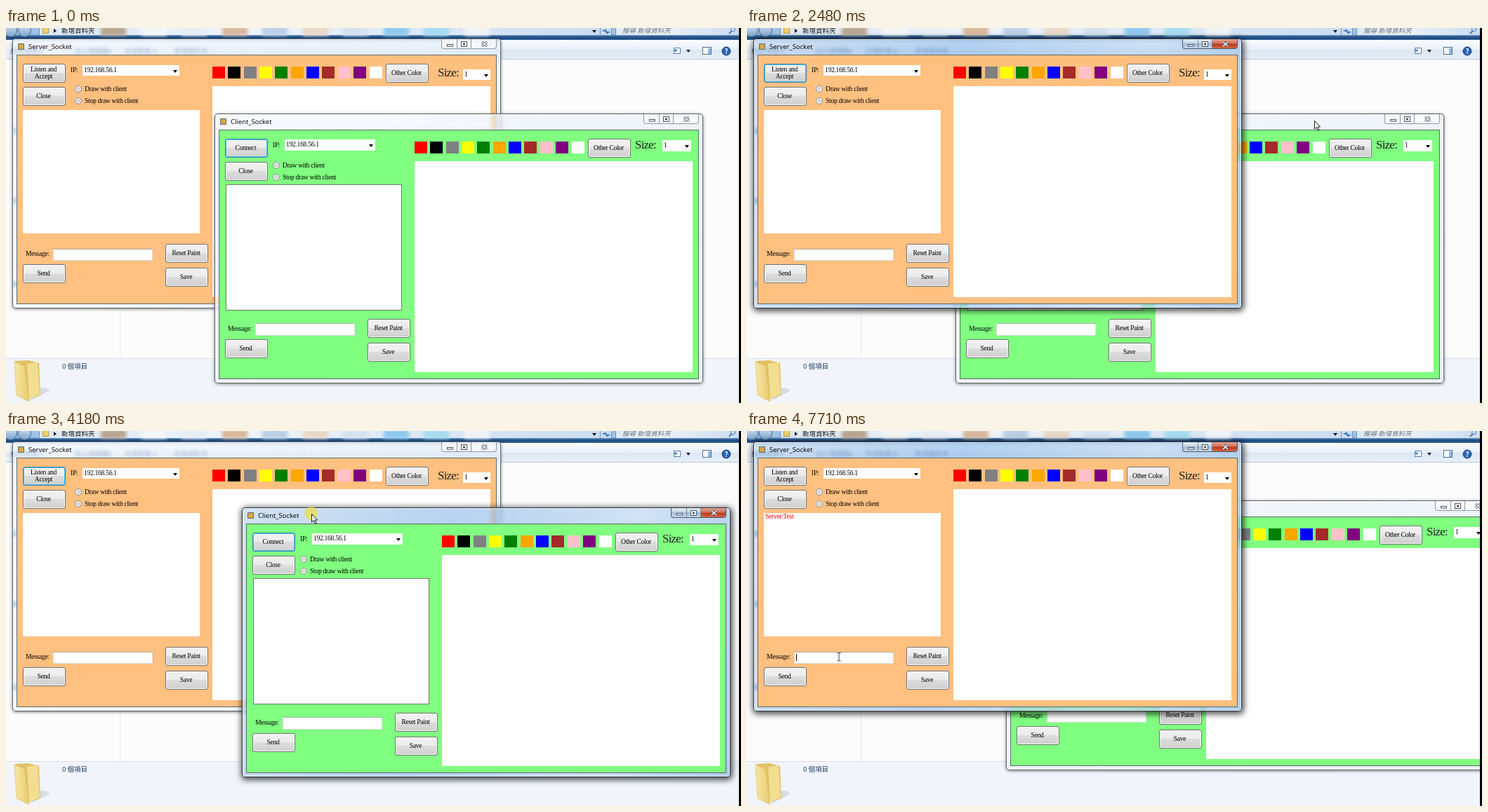
Write an HTML page that moves like this. It is 1047 px wide and 535 px high and loops after 8 s.

```html
<!DOCTYPE html>
<html lang="zh-Hant">
<head>
<meta charset="utf-8">
<title>Socket windows</title>
<style>
html, body { margin: 0; width: 100%; height: 100%; overflow: hidden; background: #fcfcfc; }
#stage { position: absolute; left: 0; top: 0; width: 1047px; height: 535px; overflow: hidden; background: #fcfcfc;
  font: 9.6px/10px 'Liberation Serif', serif; letter-spacing: -.3px; color: #000; }
#stage * { position: absolute; box-sizing: border-box; white-space: nowrap; }
#desk { inset: 0; font: 9.5px/12px 'Noto Sans CJK TC', 'Noto Sans CJK', sans-serif; letter-spacing: 0; color: #1e395b; }
#glass { left: 0; top: 0; width: 1047px; height: 18px;
  background: linear-gradient(#9fc3e6 0 9px, #3f74ae 11px, #1b4679 14px, #33659f 17px, #dfeaf6 18px); }
.field { top: -6px; height: 17px; border: 1px solid #6f91b5; background: linear-gradient(90deg, #dbe8f5, #eef4fb 35%, #c9dcf0); }
.smear { top: -2px; width: 36px; height: 13px; filter: blur(2.5px); }
.nav { top: -5px; width: 19px; height: 18px; border-radius: 50%; border: 1px solid #44688f; background: linear-gradient(#cfe0f1, #7fa5cd); }
.link { left: 9px; width: 7px; height: 9px; border-radius: 3px; background: #4c8fd0; }
#tools { left: 0; top: 17px; width: 1047px; height: 28px; border-bottom: 1px solid #b9cbe0;
  background: linear-gradient(#fafcfe, #e9f0f9 50%, #dde7f3 52%, #e6eef8); }
#tools span { top: 9px; color: #1e4a8c; }
#pane { left: 0; top: 471px; width: 1047px; height: 64px; background: #f1f5fb; border-top: 1px solid #d5dfeb; }
#split { left: 162px; top: 45px; width: 1px; height: 426px; background: #e2ebf5; }
#edge { left: 1044px; top: 0; width: 3px; height: 535px; background: #000; z-index: 9; }

.win { width: 696px; height: 385px; border-radius: 5px; z-index: 1;
  backdrop-filter: blur(2px); background: linear-gradient(100deg, rgba(244,248,253,.62), rgba(226,236,247,.58));
  box-shadow: inset 0 0 0 1px #59636f, inset 0 0 0 2px rgba(255,255,255,.75), 0 1px 4px rgba(0,0,0,.5); }
.win.front { z-index: 2; }
.win.active { background: linear-gradient(100deg, rgba(188,212,238,.66), rgba(146,188,232,.66) 40%, rgba(186,212,240,.66) 75%, rgba(140,184,228,.68));
  box-shadow: inset 0 0 0 1px #2c3540, inset 0 0 0 2px rgba(255,255,255,.7), 1px 2px 8px 2px rgba(0,0,0,.68); }
.title { left: 23px; top: 5px; font: 9.5px/13px 'Open Sans', 'Noto Sans', sans-serif; letter-spacing: 0; }
.icon { left: 8px; top: 7px; width: 9px; height: 9px; background: #d9a53c; border: 1px solid #56708f; }
.caps { left: 611px; top: 1px; width: 79px; height: 14px; border: 1px solid #8b98a8; border-top: 0; border-radius: 0 0 4px 4px;
  overflow: hidden; background: rgba(255,255,255,.45); }
.caps svg { left: 0; top: 0; }
.caps .red { display: none; left: 42px; top: 0; width: 37px; height: 14px; background: linear-gradient(#e3a597, #cf6a52 45%, #b9341a 50%, #d9714c); }
.active .caps { border-color: #4a5868; background: linear-gradient(#e4edf6, #c3d4e6 45%, #a5bcd4 50%, #c4d8ec); }
.active .red { display: block; }
.form { left: 6px; top: 23px; width: 684px; height: 356px; border: 1px solid #5b6b70; }
.btn { width: 61px; height: 27px; border: 1px solid #707070; border-radius: 3px; display: flex; align-items: center; justify-content: center;
  text-align: center; padding: 0 2px 1px 0; box-shadow: inset 0 0 0 1px #fbfbfb; background: linear-gradient(#f2f2f2, #ebebeb 48%, #dddddd 50%, #cfcfcf); }
#stage .btn span { position: static; white-space: pre; }
.btn.focus { border-color: #3c7fb1; box-shadow: inset 0 0 0 1px #4cc4ee; }
.btn.hover { border-color: #3c7fb1; background: linear-gradient(#eaf6fd, #d9f0fc 48%, #bee6fd 50%, #a7d9f5); }
.btn.down { border-color: #2c628b; box-shadow: inset 1px 1px 1px #8aa6b8; background: linear-gradient(#e5f4fc, #c4e5f6 48%, #98d1ef 50%, #68b3db); }
.box { background: #fff; }
.combo::after { content: ""; position: absolute; right: 3px; top: 7px; border: 3.5px solid transparent; border-top: 4px solid #000; border-bottom: 0; }
.combo span { left: 2px; top: 2px; }
.input { border: 1px solid #dcdcdc; border-top-color: #aaa; }
.radio { width: 10px; height: 10px; border: 1px solid #8e8f8f; border-radius: 50%; background: radial-gradient(#d0d0d0 25%, #f6f6f6 70%); }
.size { font-size: 17px; line-height: 20px; letter-spacing: -.8px; color: #222; }
#typed { left: 3px; top: 2px; }
#caret { width: 1px; height: 10px; top: 2px; background: #000; }
#chat { left: 2px; top: 0; color: #f00; }
#pointer { left: 0; top: 0; width: 0; height: 0; z-index: 5; }
#glow { left: -10px; top: -10px; width: 19px; height: 19px; border-radius: 50%; background: rgba(240,225,30,.6); }
#pointer svg { left: -12px; top: -12px; overflow: visible; }
</style>
</head>
<body>
<div id="stage">
  <div id="desk">
    <div id="glass">
      <div class="nav" style="left:-3px"></div><div class="nav" style="left:17px"></div>
      <div class="field" style="left:47px;width:816px"></div>
      <div class="field" style="left:868px;width:177px"></div>
      <div id="smears"></div>
      <div style="left:52px;top:-1px;width:9px;height:9px;background:#ecd06c;border:1px solid #b8974a"></div>
      <svg width="1047" height="18" fill="#111">
        <path d="M68 1l4 3-4 3zM835 3h6l-3 4z"/>
        <path d="M846.500 0v11" stroke="#7894b4"/>
        <path d="M850 4h5l-2-2m7 4h-5l2 2" fill="none" stroke="#2867b4" stroke-width="1.300"/>
        <path d="M1030 8l4-4" stroke="#4a78ae" stroke-width="2"/><circle cx="1035.500" cy="2" r="3" fill="none" stroke="#4a78ae"/>
      </svg>
      <span style="left:79px;top:-3px;color:#111">新增資料夾</span>
      <span style="left:878px;top:-3px;color:#66727f;font-style:italic">搜尋 新增資料夾</span>
    </div>
    <div id="tools">
      <span style="left:7px">組合管理 ▾</span><span style="left:98px">加入媒體櫃▾</span>
      <span style="left:169px">共用對象 ▾</span><span style="left:240px">新增資料夾</span>
      <svg width="1047" height="28">
        <rect x="951.500" y="11.500" width="9" height="8" fill="#fff" stroke="#5f7fa6"/><path d="M952 13.500h4v3h-4z" fill="#4f8fd0"/>
        <path d="M969 14h6l-3 4z" fill="#223"/>
        <rect x="992.500" y="10.500" width="12" height="10" fill="#fff" stroke="#4d6d96"/><path d="M1000 12h4v8h-4z" fill="#8eb6e2"/>
        <circle cx="1026" cy="16" r="6" fill="#2b62b0" stroke="#173f7b"/>
        <text x="1026" y="19.500" text-anchor="middle" font-size="10" font-weight="bold" fill="#fff">?</text>
      </svg>
    </div>
    <div class="link" style="top:142px"></div><div class="link" style="top:242px"></div><div class="link" style="top:361px"></div>
    <div id="split"></div>
    <div id="pane">
      <svg width="70" height="64">
        <defs><linearGradient id="gold"><stop stop-color="#f6e7a4"/><stop offset="1" stop-color="#e8cb70"/></linearGradient></defs>
        <path d="M34 60l29-15-9-4-12 2z" fill="#d6dce4"/>
        <path d="M13 3l19-1 15 4 2 46-22 7z" fill="#e0c163"/>
        <path d="M30 7l15-2 3 46-15 6z" fill="#f2de91"/>
        <path d="M12 4l14 6 7 51-18-9z" fill="url(#gold)" stroke="#dcbc62" stroke-width=".6"/>
      </svg>
      <span style="left:80px;top:4px">0 個項目</span>
    </div>
  </div>
  <div id="pointer">
    <div id="glow"></div>
    <svg width="24" height="24" viewBox="-12 -12 24 24">
      <path id="arrow" d="M.5 .5V12L3.200 9.600 5.200 14.300 7 13.500 5 9H8.500Z" fill="#fff" stroke="#000" stroke-width=".9"/>
      <path id="beam" d="M-2.500 -5.500H-.5L0 -5 .5 -5.500H2.500M0 -5V5.500M-2.500 6H-.5L0 5.500 .5 6H2.500" fill="none" stroke="#222" stroke-width=".9"/>
      <path id="resize" d="M0 -9L4 -5H1V5H4L0 9-4 5H-1V-5H-4Z" fill="#fff" stroke="#000" stroke-width=".9"/>
    </svg>
  </div>
  <div id="edge"></div>
</div>
<script>
const stage = document.getElementById('stage');
const $ = id => document.getElementById(id);
const COLORS = ['red', 'black', 'gray', 'yellow', 'green', 'orange', 'blue', 'brown', 'pink', 'purple', 'white'];
const LOOP = 8000;

function add(parent, cls, x, y, w, h, text) {
  const el = document.createElement('div');
  el.className = cls;
  el.style.left = x + 'px';
  el.style.top = y + 'px';
  if (w) el.style.width = w + 'px';
  if (h) el.style.height = h + 'px';
  if (text) {
    const span = document.createElement('span');
    span.textContent = text;
    el.append(span);
  }
  parent.append(el);
  return el;
}

function makeWindow(o) {
  const win = add(stage, 'win', o.x, o.y);
  win.innerHTML = `<div class="icon"></div><div class="title">${o.title}</div>
    <div class="caps"><div class="red"></div><svg width="79" height="14">
    <g fill="#fff" stroke="#4c5663"><path d="M21.500 0V14M41.500 0V14" opacity=".6"/>
    <rect x="7.500" y="7.500" width="8" height="2.500"/><rect x="27.500" y="3.500" width="8" height="7"/><rect x="30.500" y="6" width="2" height="2"/></g>
    <path d="M57 4l7 6m0-6l-7 6" stroke="#4c5663" stroke-width="3"/><path d="M57 4l7 6m0-6l-7 6" stroke="#fff" stroke-width="1.500"/></svg></div>`;
  add(win, 'form', 6, 23).style.background = o.color;
  const button = (x, y, text) => add(win, 'btn', x, y, 0, 0, text);
  const main = button(15, 36, o.main);
  button(15, 69, 'Close');
  button(15, 322, 'Send');
  button(218, 293, 'Reset Paint');
  button(218, 327, 'Save');
  button(532, 36, 'Other Color');
  add(win, '', 83, 40, 14, 10, 'IP:');
  add(win, 'box combo', ...o.ip, '192.168.56.1');
  add(win, 'box combo', ...o.sizeBox, '1');
  add(win, 'size', o.size[0], o.size[1] - 10, 40, 20, 'Size:');
  ['Draw with client', 'Stop draw with client'].forEach((text, i) => {
    const [x, y] = o.radio;
    add(win, 'radio', x - 5, y - 5 + i * 17);
    add(win, '', x + 9, y - 5 + i * 17, 90, 10, text);
  });
  COLORS.forEach((c, i) => add(win, '', Math.round(285 + i * 22.35), 40, 18, 17).style.background = c);
  add(win, 'box', 285, 68, 396, 301);
  const list = add(win, 'box', ...o.list);
  add(win, '', 19, 302, 40, 10, 'Message:');
  const input = add(win, 'box input', ...o.input);
  return { win, main, list, input };
}

const server = makeWindow({
  x: 9, y: 15, title: 'Server_Socket', color: '#ffc080', main: 'Listen and\nAccept',
  ip: [100, 38, 138, 15], sizeBox: [642, 44, 39, 15], size: [606, 49], radio: [94, 72],
  list: [15, 102, 252, 176], input: [58, 300, 142, 17]
});
const client = makeWindow({
  x: 297, y: 122, title: 'Client_Socket', color: '#80ff80', main: 'Connect',
  ip: [100, 37, 129, 16], sizeBox: [638, 38, 41, 16], size: [599, 45], radio: [88, 74],
  list: [16, 101, 251, 180], input: [58, 299, 142, 18]
});
client.list.style.border = '1px solid #6f7a70';
server.list.innerHTML = '<span id="chat">Server:Test</span>';
server.input.innerHTML = '<span id="typed"></span><span id="caret"></span>';

['#b8a48e', '#f4f6f8', '#e6eef5', '#d9b79a', '#b9cfe6', '#e8d8c8', '#d4e2f0', '#8cc8ee', '#a5dcf0', '#f0f4f8']
  .forEach((c, i) => add($('smears'), 'smear', 135 + i * 57.5, -2).style.background = c);

// Pointer moves: start, end, steps, then the points passed through.
const MOVES = [
  [70, 400, 4, [921, 118], [227, 495]],
  [610, 710, 1, [1, 354], [59, 75]],
  [1560, 2170, 8, [59, 75], [804, 121]],
  [2240, 2240, 1, [808, 127], [808, 127]],
  [2410, 2480, 1, [806, 130], [808, 132]],
  [2730, 3200, 6, [808, 132], [361, 170]],
  [3800, 3880, 1, [380, 149], [396, 131]],
  [4110, 4180, 1, [396, 131], [435, 118]],
  [4260, 4340, 1, [456, 112], [468, 108]],
  [4420, 4740, 4, [468, 108], [168, 300]],
  [4910, 4980, 1, [168, 304], [168, 307]],
  [5230, 5620, 5, [168, 307], [131, 322]]
];
const CLICKS = [[1390, 1480], [2650, 2730], [3430, 3480], [4110, 4420], [5150, 5230], [5700, 5780]];
const KEYS = [6700, 6930, 7100, 7330];

const within = (t, a, b) => t >= a && t < b;
const over = ([x, y], l, top, w, h) => x >= l && x < l + w && y >= top && y < top + h;

function pointerAt(t) {
  const [a, b, n, p, q] = MOVES.filter(m => t >= m[0]).pop() || MOVES[0];
  const k = b > a ? Math.min(1, Math.floor((t - a) / (b - a) * n + 1e-6) / n) : 1;
  const e = k * k * (3 - 2 * k);
  return [p[0] + (q[0] - p[0]) * e, p[1] + (q[1] - p[1]) * e];
}

function dragAt(t) {
  if (t < 4180) return [0, 0];
  if (t < 4260) return [39, -13];
  return t < 4340 ? [60, -19] : [72, -23];
}

const show = (el, on) => { el.style.display = on ? '' : 'none'; };

function draw(t) {
  const p = pointerAt(t);
  const pressed = CLICKS.some(([a, b]) => within(t, a, b));
  const serverOn = within(t, 1390, 2650) || t >= 5150;
  const clientOn = within(t, 2650, 5150);
  server.win.classList.toggle('active', serverOn);
  server.win.classList.toggle('front', serverOn);
  client.win.classList.toggle('active', clientOn);
  client.win.classList.toggle('front', !serverOn);

  const [dx, dy] = dragAt(t);
  client.win.style.left = 297 + dx + 'px';
  client.win.style.top = 122 + dy + 'px';

  const visible = within(t, 70, 400) || within(t, 610, 6700) || t >= 7710;
  const onListen = visible && t > 600 && over(p, 24, 51, 61, 27);
  const onConnect = clientOn && over(p, 312 + dx, 158 + dy, 61, 27);
  server.main.className = 'btn' + (within(t, 1390, 5700) ? ' focus' : '') + (onListen ? ' hover' : '') + (onListen && pressed ? ' down' : '');
  client.main.className = 'btn' + (t < 5150 ? ' focus' : '') + (onConnect ? ' hover' : '') + (onConnect && pressed ? ' down' : '');

  const typing = t < 7630;
  $('typed').textContent = typing ? 'Test'.slice(0, KEYS.filter(k => t >= k).length) : '';
  $('caret').style.left = 2 + $('typed').offsetWidth + 'px';
  show($('caret'), within(t, 5700, 6240) || t >= 6700);
  show($('chat'), !typing);

  const beam = serverOn && over(p, 67, 315, 142, 17);
  const resize = within(t, 2240, 2410);
  show($('pointer'), visible);
  $('pointer').style.transform = `translate(${Math.round(p[0])}px, ${Math.round(p[1])}px)`;
  show($('glow'), pressed);
  show($('beam'), beam);
  show($('resize'), resize);
  show($('arrow'), !beam && !resize);
}

const start = performance.now();
function tick() {
  draw((performance.now() - start) % LOOP);
  requestAnimationFrame(tick);
}
tick();
</script>
</body>
</html>
```
